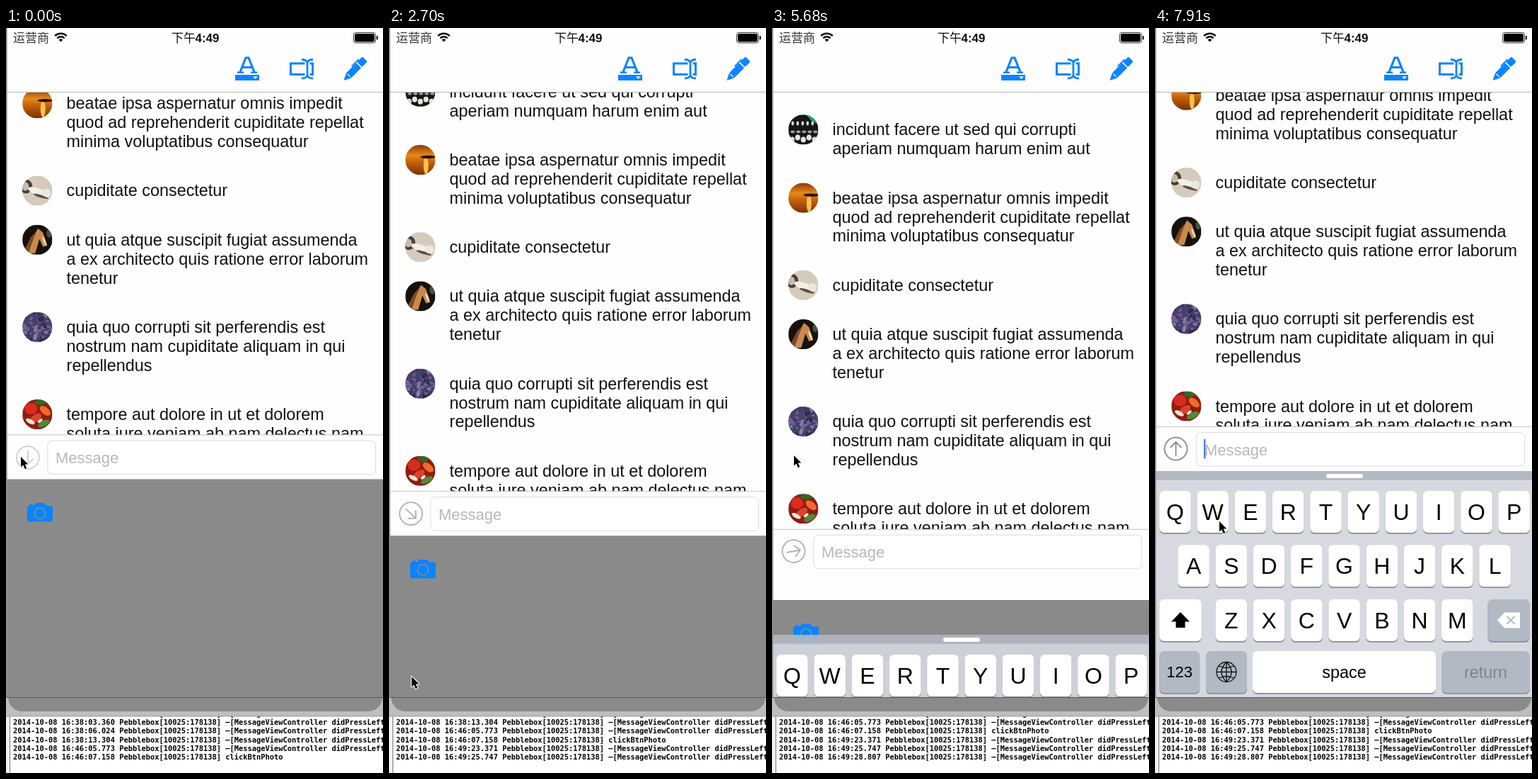
These frames come from a looping animation (533 by 1051 pixels, 8000 ms). An HTML page with a canvas:

```html
<!DOCTYPE html>
<html lang="en">
<head>
<meta charset="utf-8">
<title>Chat input demo</title>
<style>
html, body { margin: 0; width: 100%; height: 100%; overflow: hidden; background: #fff; }
canvas { display: block; width: 533px; height: 1051px; }
</style>
</head>
<body>
<canvas id="stage"></canvas>
<script>
const W = 533, H = 1051, LOOP = 8000;
const FLOOR = 944;            // bottom edge of the phone screen
const BLUE = '#0a84ff', KEY_GRAY = '#b1b9c4';
const SANS = '"Liberation Sans", Arial, sans-serif';
const CJK = '"Noto Sans CJK SC", "Noto Sans CJK", sans-serif';
const MONO = '"DejaVu Sans Mono", monospace';

const canvas = document.getElementById('stage');
const c = canvas.getContext('2d');
const dpr = window.devicePixelRatio || 1;
canvas.width = W * dpr;
canvas.height = H * dpr;

// ---------- timing ----------
// [first, last, count] of each run of picture changes
const RUNS = [[150, 600, 4], [900, 1650, 6], [2400, 3300, 7], [3450, 4350, 7],
  [4500, 4940, 4], [5390, 6420, 8], [6570, 6720, 2], [7470, 7910, 4]];
const STEPS = [0];
for (const [a, b, n] of RUNS)
  for (let i = 0; i < n; i++) STEPS.push(Math.floor((a + (b - a) * i / (n - 1)) / 10) * 10);

const PANEL = [[80, 0], [2480, 1], [3690, 0], [5527, 1], [7420, 0]];
const KEYS_UP = [[3690, 1], [5527, 0], [7420, 1]];
const PRESSES = [-50, 2400, 5390];
const POINTER = [[0, 21, 605], [300, 21, 605], [600, 25, 669], [750, 25, 669], [1650, 32, 915],
  [2700, 32, 915], [3300, 130, 640], [3600, 155, 614], [3750, 155, 614], [4350, 30, 621],
  [4940, 31, 603], [5980, 31, 603], [6420, 114, 621], [6720, 118, 609], [7400, 118, 609], [7910, 91, 696]];

const clamp = x => Math.max(0, Math.min(1, x));
const smooth = x => x * x * (3 - 2 * x);
const easeOut = n => x => 1 - (1 - x) ** n;
const snap = t => STEPS.filter(s => s <= t).pop();

function track(t, events, start, duration, ease) {
  let v = start;
  for (const [at, to] of events) v += (to - v) * ease(clamp((t - at) / duration));
  return v;
}

function pointerAt(t) {
  const i = POINTER.findIndex(p => p[0] > t);
  if (i < 0) return POINTER[POINTER.length - 1].slice(1);
  const [t0, x0, y0] = POINTER[i - 1], [t1, x1, y1] = POINTER[i];
  const k = smooth((t - t0) / (t1 - t0));
  return [x0 + (x1 - x0) * k, y0 + (y1 - y0) * k];
}

function poseAt(t) {
  const open = track(t, PANEL, 1, 330, smooth);
  const keys = track(t, KEYS_UP, 0, 438, easeOut(3));
  let lift = 0;
  if (t >= 5527 && t < 7420) lift = track(t, [[5527, 0]], 1, 438, easeOut(5));
  else if (t >= 3690) lift = 1 - open;
  let tone = 1;
  for (const p of PRESSES) if (t >= p && t < p + 600) tone = 1 - 0.65 * (1 - (t - p) / 600);
  const focused = (t >= 3750 && t < 5500) || t >= 7470;
  const blink = t < 4300 || t > 4900 ? 1 : t < 4400 ? 0.55 : 0;
  return {
    open, tone,
    bar: 881.5 - 307.5 * open - 319 * lift,
    panel: FLOOR - 307.5 * open,
    keyboard: FLOOR - 319 * keys,
    caret: focused ? blink : 0,
    lastLog: 4 + (t >= 150) + (t >= 2550) + (t >= 5500),
    pointer: pointerAt(t)
  };
}

// ---------- drawing helpers ----------
function rect(color, x, y, w, h) { c.fillStyle = color; c.fillRect(x, y, w, h); }

function round(color, x, y, w, h, r) {
  c.beginPath(); c.roundRect(x, y, w, h, r);
  c.fillStyle = color; c.fill();
}

function oval(color, x, y, rx, ry = rx, turn = 0) {
  c.beginPath(); c.ellipse(x, y, rx, ry, turn, 0, 7);
  c.fillStyle = color; c.fill();
}

function poly(color, ...pts) {
  c.beginPath();
  for (let i = 0; i < pts.length; i += 2) c.lineTo(pts[i], pts[i + 1]);
  c.closePath(); c.fillStyle = color; c.fill();
}

function stroke(color, width, d) {
  c.strokeStyle = color; c.lineWidth = width; c.stroke(new Path2D(d));
}

function label(str, x, y, font, color = '#111', align = 'left') {
  c.font = font; c.fillStyle = color; c.textAlign = align;
  c.fillText(str, x, y);
}

function within(x, y, w, h, draw) {
  c.save(); c.beginPath(); c.rect(x, y, w, h); c.clip(); draw(); c.restore();
}

function random(seed) {
  return () => (seed = (seed * 16807) % 2147483647) / 2147483647;
}

// ---------- avatars, drawn around 0,0 with radius 21 ----------
function dog() {
  rect('#d9c9b5', -21, -21, 42, 42);
  oval('#b98f68', 0, -4, 17, 11);
  oval('#e2cdb4', 3, 6, 13, 8);
  oval('#3b2a22', -5, 1, 2.5); oval('#3b2a22', 6, 2, 2);
  rect('#8f7a66', -21, 15, 42, 6);
}
function wall() {
  rect('#cdbfae', -21, -21, 42, 42);
  poly('#e3dccf', -21, -21, 0, -21, 0, 2, -21, 8);
  poly('#2f78c4', 0, -21, 21, -21, 21, 8, 0, 2);
  poly('#9cc0de', 5, -21, 9, -21, 9, 4, 5, 3);
  poly('#8a7c70', -14, -21, -11, -21, -11, 5, -14, 6);
}
function beads() {
  rect('#16161a', -21, -21, 42, 42);
  poly('#22a06a', 4, -21, 21, -21, 21, -8, 12, -12);
  for (let i = 0; i < 5; i++) {
    oval('#e9e4da', -16 + i * 8, 14 - i % 2 * 3, 3.6, 4);
    oval('#a89c8c', -15 + i * 8, 3, 3, 1.8);
    oval('#d8d8d4', -15 + i * 7, -9, 1.8, 3);
  }
}
function sunset() {
  const g = c.createLinearGradient(0, -21, 0, 21);
  g.addColorStop(0, '#8c3c08'); g.addColorStop(0.35, '#e88a18');
  g.addColorStop(0.55, '#c8650c'); g.addColorStop(1, '#7a3204');
  rect(g, -21, -21, 42, 42);
  oval('#ffc24a', 8, 8, 3.5, 12);
  oval('#2a1206', 11, -4, 11, 2.2);
}
function pipe() {
  rect('#d6cabb', -21, -21, 42, 42);
  oval('#4c4038', -16, -6, 9, 10);
  oval('#c8bba8', -17, -6, 5, 6);
  oval('#f2efe9', 2, 2, 16, 5, 0.35);
  oval('#5a5047', 5, 8, 11, 2, 0.3);
  oval('#ece7df', 13, 3, 6, 6);
}
function horse() {
  rect('#15110d', -21, -21, 42, 42);
  poly('#c88a4c', 1, -16, 8, -10, 14, 8, 8, 10, 3, -1, -3, 19, -13, 19, -6, -4);
  poly('#7a4a24', -1, -12, -6, 0, -12, 18, -18, 14, -9, -4);
  oval('#efd9b8', 10, 2, 1.6, 7, -0.35);
  oval('#46543a', 17, -9, 4, 6);
}
function galaxy() {
  rect('#493f6a', -21, -21, 42, 42);
  const rnd = random(77), tones = ['#2b2b4c', '#76589a', '#5d6f96', '#9a7aa6', '#352a50'];
  for (let i = 0; i < 70; i++)
    oval(tones[i % 5], rnd() * 42 - 21, rnd() * 42 - 21, 1 + rnd() * 3.5, 0.8 + rnd() * 2, rnd() * 3);
}
function salad() {
  rect('#8f1d12', -21, -21, 42, 42);
  oval('#d92c1c', -9, -8, 9, 8);
  oval('#2f6a24', 4, -17, 8, 4);
  oval('#f06a2c', 11, -5, 9, 5, 0.7);
  oval('#e2402a', -2, 5, 9, 5, -0.6);
  oval('#f0e4d4', -10, 10, 7, 3, 0.5);
  oval('#4f8a34', 9, 13, 9, 4, -0.5);
  oval('#f3efe2', 4, 9, 4, 2, -0.7);
}

const ROWS = [
  [dog, 'saepe et non accusantium consectetur', 'nobis totam quia'],
  [wall, 'sed rem ut exercitationem eos reiciendis', 'ut suscipit architecto omnis est officia', 'fugit atque sed'],
  [beads, 'incidunt facere ut sed qui corrupti', 'aperiam numquam harum enim aut'],
  [sunset, 'beatae ipsa aspernatur omnis impedit', 'quod ad reprehenderit cupiditate repellat', 'minima voluptatibus consequatur'],
  [pipe, 'cupiditate consectetur'],
  [horse, 'ut quia atque suscipit fugiat assumenda', 'a ex architecto quis ratione error laborum', 'tenetur'],
  [galaxy, 'quia quo corrupti sit perferendis est', 'nostrum nam cupiditate aliquam in qui', 'repellendus'],
  [salad, 'tempore aut dolore in ut et dolorem', 'soluta iure veniam ab nam delectus nam']
];

function drawList(bar) {
  let y = bar - 29;
  for (let i = ROWS.length - 1; i >= 0; i--) {
    const [avatar, ...lines] = ROWS[i];
    if (i < ROWS.length - 1) y -= 26.95 * lines.length + 42.3;
    c.save();
    c.translate(44.3, y);
    c.beginPath(); c.arc(0, 0, 21.3, 0, 7); c.clip();
    avatar();
    c.restore();
    lines.forEach((s, n) => label(s, 85.6, y + 8 + n * 26.95, '23.4px ' + SANS));
  }
}

// ---------- fixed parts ----------
function drawTop() {
  rect('#fefefe', 0, 0, W, 90);
  rect('#b8b8b8', 0, 90, W, 1);
  label('运营商', 10, 20, '17px ' + CJK, '#333');
  label('下午', 234, 20, '500 17px ' + CJK);
  label('4:49', 267.5, 20, 'bold 17px ' + SANS);
  const fan = (r, w) => {
    c.beginPath(); c.arc(77.5, 19.5, r, -2.35, -0.79);
    c.strokeStyle = '#111'; c.lineWidth = w; c.stroke();
  };
  fan(2, 4); fan(7.3, 2.5); fan(11.8, 2.5);
  c.beginPath(); c.roundRect(491.5, 6.5, 31, 14.5, 3);
  c.strokeStyle = '#333'; c.lineWidth = 1; c.stroke();
  round('#000', 493, 8, 28, 11.5, 2);
  round('#111', 523.8, 11, 2, 5.5, 1);

  // text colour
  stroke(BLUE, 3.2, 'M331 62 L339 42 H343 L351 62 M334.5 55.5 H347.5');
  stroke(BLUE, 2.6, 'M327 62.7 H336 M346 62.7 H355');
  rect(BLUE, 324, 66, 34, 8);
  poly('#fff', 349, 68.5, 356, 68.5, 352.5, 72);
  // text field
  stroke(BLUE, 3, 'M402.5 50 H433.5 V65.5 H402.5 Z');
  rect('#fefefe', 422.5, 47, 7, 22);
  stroke(BLUE, 2.8, 'M426 48 V68 M418 44.5 Q425 44.5 426 49 Q427 44.5 434 44.5 M418 71 Q425 71 426 66.5 Q427 71 434 71');
  // pen
  c.save();
  c.translate(477.5, 74); c.rotate(-0.79);
  poly(BLUE, 0, 0, 8, -4, 11, -5, 30, -5, 30, 5, 11, 5, 8, 4);
  round(BLUE, 31.5, -5, 11, 10, 2);
  rect(BLUE, 22, -7, 14, 2);
  rect('#fefefe', 9.5, -3, 1.2, 6);
  c.restore();
}

const DAY = '2014-10-08 ', APP = ' Pebblebox[10025:178138] ';
const LOGS = ['16:38:03.360', '16:38:06.024', '16:38:13.304', '16:46:05.773',
  '16:46:07.158', '16:49:23.371', '16:49:25.747', '16:49:28.807'];

function drawDesk(lastLog) {
  rect('#fff', 0, FLOOR, W, H - FLOOR);
  within(0, 971, W, 80, () => {
    for (let i = 0; i < 6; i++) {
      const n = lastLog - i;
      const what = n === 4 ? 'clickBtnPhoto' : '–[MessageViewController didPressLeftButton:]';
      label(DAY + (LOGS[n] || '16:37:58.112') + APP + what, 10, 1032 - i * 12.2, 'bold 10.4px ' + MONO, '#000');
    }
  });
  rect('#f2f2f2', 0, 971, 5, 80);
  rect('#777', 5, 971, 1, 80);
  rect('#bebebe', 0, FLOOR, W, 27);
  round('#8a8a8a', 3, FLOOR - 20, 529, 40, 20);
  rect('#999', 0, 970.5, W, 1);
}

// ---------- moving parts ----------
function drawInput(p) {
  const y = p.bar;
  rect('#fdfdfd', 0, y, W, FLOOR - y);
  rect('#c4c4c4', 0, y - 0.5, W, 1);
  c.beginPath(); c.roundRect(58.8, y + 8, 463.7, 47.5, 7);
  c.fillStyle = '#fff'; c.fill();
  c.strokeStyle = '#dcdcdc'; c.lineWidth = 1; c.stroke();
  label('Message', 70, y + 40, '22px ' + SANS, '#b8b8bc');
  if (p.caret) {
    c.globalAlpha = p.caret;
    rect('#4d78ee', 69, y + 17.5, 2.4, 27.5);
  }
  c.save();
  c.globalAlpha = p.tone;
  c.translate(30.2, y + 31.6);
  c.rotate(Math.PI * p.open);
  c.translate(-0.7, -0.5);
  stroke('#8a8a8e', 1.8, 'M16 0 A16 16 0 1 1 -16 0 A16 16 0 1 1 16 0 M0 10 V-9.5 M-8 -1.5 L0 -9.5 L8 -1.5');
  c.restore();
  c.globalAlpha = 1;
}

function drawPanel(y) {
  rect('#8a8a8a', 0, y, W, FLOOR - y);
  c.save();
  c.translate(30, y + 33.5);
  round(BLUE, 0, 4, 36, 22.5, 2);
  poly(BLUE, 9, 5, 12, 0, 24, 0, 27, 5);
  rect(BLUE, 3, 2, 5, 3);
  c.beginPath(); c.arc(18, 14.5, 7.6, 0, 7);
  c.strokeStyle = '#7b8da0'; c.lineWidth = 1.6; c.stroke();
  c.restore();
}

function key(x, y, w, text, size = 32, fill = '#fff', ink = '#000') {
  round('#8b8f96', x, y + 1.5, w, 59.3, 6.5);
  round(fill, x, y, w, 59, 6.5);
  if (text) label(text, x + w / 2, y + 29.5 + size * 0.355, size + 'px ' + SANS, ink, 'center');
}

function drawKeyboard(y) {
  if (y >= FLOOR) return;
  c.save();
  c.translate(0, y);
  const moving = y > 626;
  c.globalAlpha = moving ? 0.9 : 1;
  rect('#d6d9e0', 0, 12, W, 308);
  rect('#b3bac4', 0, 0, W, 13);
  c.globalAlpha = 1;
  round('#fff', 242, 4, 52, 6, 3);
  [['QWERTYUIOP', 6.2, 28], ['ASDFGHJKL', 32.3, 104.3], ['ZXCVBNM', 85.6, 181]].forEach(([row, x, top]) =>
    [...row].forEach((ch, i) => key(x + i * 53.25, top, 44.5, ch)));
  key(6.2, 181, 59.5);
  poly('#000', 36, 199, 49, 212.5, 42.5, 212.5, 42.5, 221, 29.5, 221, 29.5, 212.5, 23, 212.5);
  key(470.5, 181, 59, '', 0, KEY_GRAY);
  poly('#fff', 484, 210.5, 494, 199.5, 516, 199.5, 516, 221.5, 494, 221.5);
  stroke(KEY_GRAY, 1.8, 'M497.5 205 L508.5 216 M508.5 205 L497.5 216');
  key(6.2, 254, 57, '123', 22, KEY_GRAY);
  key(72, 254, 58, '', 0, KEY_GRAY);
  stroke('#111', 1.3, 'M87 283.5 A14 14 0 1 1 115 283.5 A14 14 0 1 1 87 283.5 H115 M101 269.5 V297.5' +
    ' M101 269.5 Q87 283.5 101 297.5 Q115 283.5 101 269.5 M90.5 275 Q101 280 111.5 275 M90.5 292 Q101 287 111.5 292');
  key(138, 254, 259, 'space', 23.4);
  key(405.5, 254, 124, 'return', 23.4, KEY_GRAY, '#80848b');
  c.restore();
}

function drawPointer([x, y]) {
  c.save();
  c.translate(x, y);
  const shape = new Path2D('M0 0 V14.5 L3.3 11.4 L5.8 17.2 L8.3 16.1 L5.8 10.5 H10.4 Z');
  c.lineJoin = 'round';
  c.strokeStyle = '#fff'; c.lineWidth = 2.2; c.stroke(shape);
  c.fillStyle = '#000'; c.fill(shape);
  c.restore();
}

function draw(t) {
  const p = poseAt(snap(t));
  c.setTransform(dpr, 0, 0, dpr, 0, 0);
  rect('#fefefe', 0, 0, W, H);
  drawDesk(p.lastLog);
  within(0, 0, W, FLOOR, () => {
    rect('#fefefe', 0, 0, W, FLOOR);
    drawList(p.bar);
    drawInput(p);
    drawPanel(p.panel);
    drawKeyboard(p.keyboard);
    drawTop();
    rect('#8f8f8f', 0, 0, 1.7, FLOOR);
  });
  rect('#5c5c5c', 0, FLOOR, W, 1);
  drawPointer(p.pointer);
}

const begin = performance.now();
function frame() {
  draw((performance.now() - begin) % LOOP);
  requestAnimationFrame(frame);
}
frame();
</script>
</body>
</html>
```
